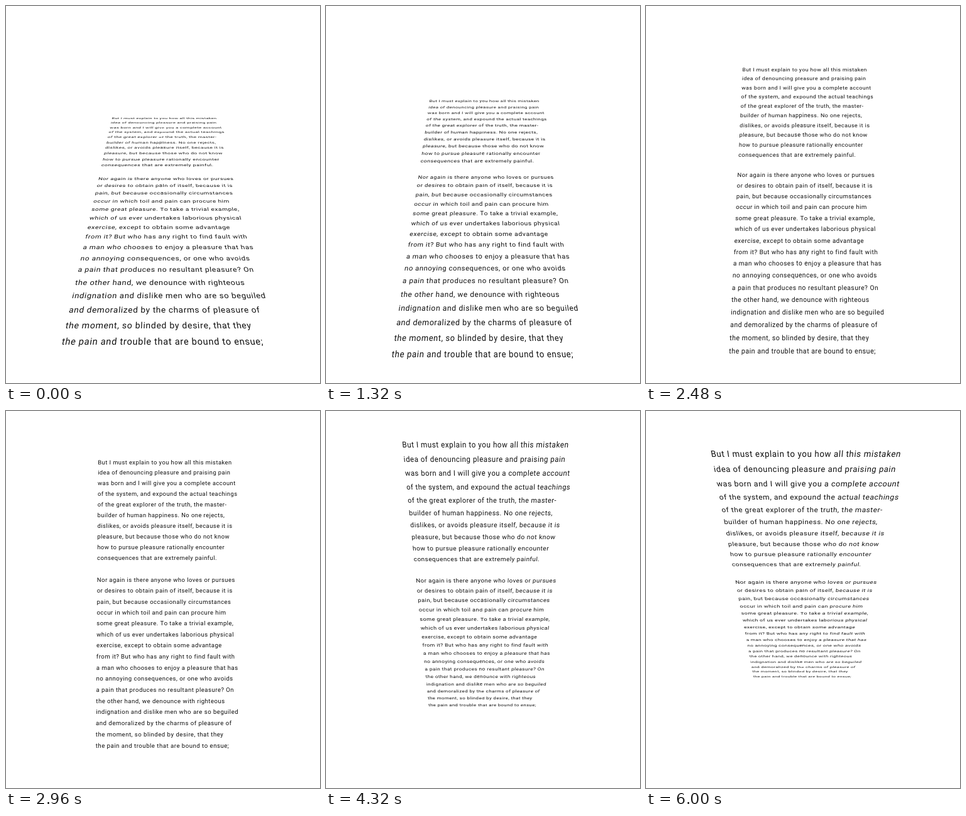
An HTML page with a canvas for the animation above (6040 ms loop, 500 by 600 pixels).

```html
<!DOCTYPE html>
<html lang="en">
<head>
<meta charset="utf-8">
<title>Tilting text</title>
<style>
  html, body {
    margin: 0;
    width: 100%;
    height: 100%;
    overflow: hidden;
    background: #fff;
  }
  canvas { display: block; }
</style>
</head>
<body>
<canvas id="stage" width="500" height="600"></canvas>
<script>
const TEXT = `But I must explain to you how all this mistaken
idea of denouncing pleasure and praising pain
was born and I will give you a complete account
of the system, and expound the actual teachings
of the great explorer of the truth, the master-
builder of human happiness. No one rejects,
dislikes, or avoids pleasure itself, because it is
pleasure, but because those who do not know
how to pursue pleasure rationally encounter
consequences that are extremely painful.

Nor again is there anyone who loves or pursues
or desires to obtain pain of itself, because it is
pain, but because occasionally circumstances
occur in which toil and pain can procure him
some great pleasure. To take a trivial example,
which of us ever undertakes laborious physical
exercise, except to obtain some advantage
from it? But who has any right to find fault with
a man who chooses to enjoy a pleasure that has
no annoying consequences, or one who avoids
a pain that produces no resultant pleasure? On
the other hand, we denounce with righteous
indignation and dislike men who are so beguiled
and demoralized by the charms of pleasure of
the moment, so blinded by desire, that they
the pain and trouble that are bound to ensue;`;

const LOOP = 6040, MOVE = 6000;
const FROM = 46.2, TO = -43.6;            // tilt in degrees
const DEPTH = 503;                        // distance of the eye
const EYE = { x: 248.5, y: 304 };         // vanishing point
const AXIS = 285.6 - EYE.y;               // the sheet turns about this height
const AXIS_ROW = 12, LEADING = 17.34;
const LEFT = -103.8, SIZE = 9.5, TRACKING = 0.45;
const BASELINE = 3.6;                     // below the middle of a row
const EM = 100, SCALE = SIZE / EM;        // glyphs are set large, then scaled

const ctx = document.getElementById("stage").getContext("2d");
ctx.font = EM + "px Roboto, 'Liberation Sans', sans-serif";
ctx.textAlign = "center";

const glyphs = TEXT.split("\n").flatMap((line, row) => {
  let x = LEFT;
  return [...line].map(char => {
    const width = ctx.measureText(char).width * SCALE;
    const glyph = { char, x: x + width / 2, u: (row - AXIS_ROW) * LEADING };
    x += width + TRACKING;
    return glyph;
  });
}).filter(glyph => glyph.char !== " ");

// Each glyph gets the local slope of the perspective at its own place.
function drawGlyph({ char, x, u }, sin, cos) {
  const s = DEPTH / (DEPTH - u * sin);
  const growth = s * s * sin / DEPTH;
  const y = AXIS + u * cos;
  ctx.setTransform(
    s * SCALE, 0,
    x * growth * SCALE, (cos * s + y * growth) * SCALE,
    EYE.x + x * s, EYE.y + y * s
  );
  ctx.fillText(char, 0, BASELINE / SCALE);
}

function draw(time) {
  const p = Math.min(time % LOOP / MOVE, 1);
  const eased = p * p * (3 - 2 * p);
  const angle = (FROM + (TO - FROM) * eased) * Math.PI / 180;
  const sin = Math.sin(angle), cos = Math.cos(angle);
  ctx.resetTransform();
  ctx.fillStyle = "#fff";
  ctx.fillRect(0, 0, 500, 600);
  ctx.fillStyle = "#111";
  for (const glyph of glyphs) drawGlyph(glyph, sin, cos);
}

const start = performance.now();
function tick() {
  draw(performance.now() - start);
  requestAnimationFrame(tick);
}
tick();
</script>
</body>
</html>
```
